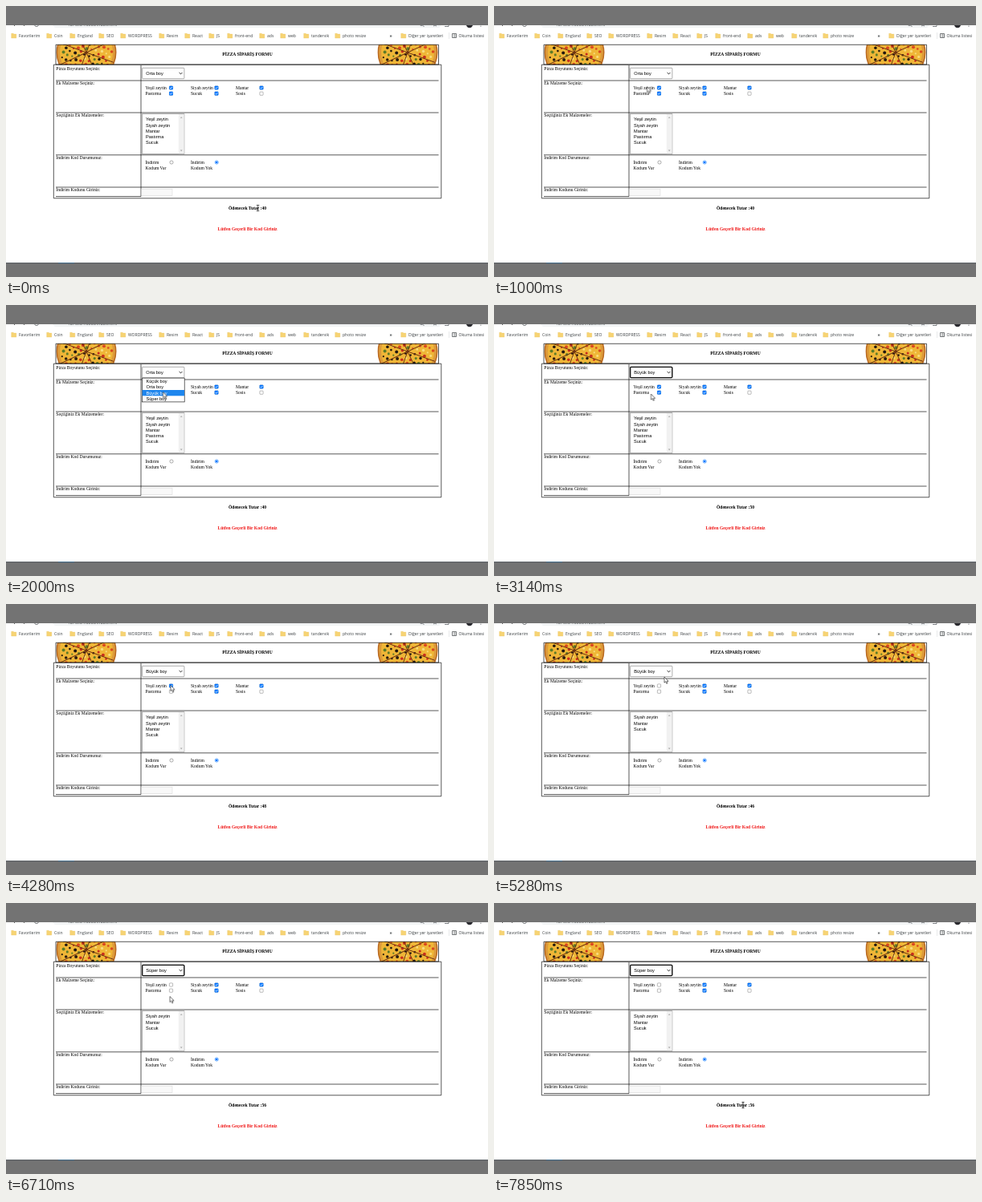
These frames come from a looping animation (600x338 px, 8000 ms). An HTML page:

```html
<!DOCTYPE html>
<html lang="tr">
<head>
<meta charset="utf-8">
<title>Pizza sipariş formu</title>
<style>
html, body { margin: 0; height: 100%; overflow: hidden; background: #fff; }
svg { display: block; width: 100vw; height: 100vh; }
text { font: 5.6px "Liberation Serif", "Times New Roman", serif; }
.sans { font-family: "Liberation Sans", Arial, sans-serif; }
.bar { font: 5.05px "Open Sans", "Noto Sans", sans-serif; fill: #3c4043; }
.bold { font-weight: bold; }
.mid { text-anchor: middle; }
.line { fill: none; stroke: #111; stroke-width: .7; }
.field { fill: #fff; stroke: #767676; stroke-width: .6; }
.icon { fill: none; stroke: #5f6368; stroke-width: .8; }
#pointer { animation: move 8s ease-in-out infinite; }
@keyframes move {
  0%, 1.75% { transform: translate(313.5px, 252px); }
  10.75%, 12.5% { transform: translate(190.5px, 100.5px); }
  16%, 17.9% { transform: translate(196px, 84px); }
  23.25%, 28.6% { transform: translate(195.5px, 108.5px); }
  30.4%, 41.1% { transform: translate(195.5px, 111px); }
  46.25%, 48.25% { transform: translate(205px, 108.5px); }
  51.75%, 60.75% { transform: translate(205px, 101.5px); }
  66% { transform: translate(212px, 91px); }
  67.9%, 69.6% { transform: translate(212px, 85px); }
  75%, 78.6% { transform: translate(204px, 114.5px); }
  80.4%, 89.25% { transform: translate(204px, 116.5px); }
  94.6%, 100% { transform: translate(310px, 252px); }
}
</style>
</head>
<body>
<svg id="stage" viewBox="0 0 600 338" preserveAspectRatio="none"></svg>
<script>
const LOOP = 8000;
// Moments of the session, in ms
const OPEN_1 = 1430, PICK_1 = 2290, UNCHECK_1 = 3860, UNCHECK_2 = 4290, OPEN_2 = 5570, PICK_2 = 6290;

const text = (x, y, str, cls = '', extra = '') => `<text x="${x}" y="${y}" class="${cls}" ${extra}>${str}</text>`;
const rect = (x, y, w, h, extra = '') => `<rect x="${x}" y="${y}" width="${w}" height="${h}" ${extra}/>`;
const path = (d, extra = 'class="line"') => `<path d="${d}" ${extra}/>`;
const dot = (x, y, r, extra) => `<circle cx="${x}" cy="${y}" r="${r}" ${extra}/>`;
const during = (spans, content) => `<g data-on="${spans.join(' ')}">${content}</g>`;

function browserBar() {
  const folders = [[16, 'Favorilerim'], [60, 'Coin'], [89, 'England'], [125, 'SEO'], [152, 'WORDPRESS'],
    [200, 'Resim'], [232, 'React'], [262, 'JS'], [285, 'front-end'], [325, 'ads'], [351, 'web'],
    [380, 'tandervik'], [419, 'photo resize'], [501, 'Diğer yer işaretleri']];
  const folder = ([x, name]) =>
    path(`M${x - 9.3} 34.2h2.4l.8 .9h2.9v5h-6.1z`, 'fill="#f7d474" stroke="#e3bb52" stroke-width=".3"') +
    text(x, 38.9, name, 'bar');
  return rect(58, 18, 484, 9, 'rx="4.5" fill="#f1f3f4"') +
    text(77, 25.2, '127.0.0.1:5500/index.html', 'bar') +
    path('M9 23l2 2M22 25l2-2') + dot(38, 23, 2.6, 'class="icon"') +
    dot(517, 22.5, 2, 'class="icon"') + path('M518.5 24l2 2M532 25l2-1 2 1M546 25.5h5v-2', 'class="icon"') +
    dot(577, 23, 4.2, 'fill="#2b2b30"') + dot(591, 25.2, .6, 'fill="#5f6368"') +
    folders.map(folder).join('') +
    text(477.5, 38.7, '»', 'bar bold') +
    path('M551.5 33v8', 'stroke="#dadce0" stroke-width=".6"') +
    path('M555.5 34.5h5v5h-5zM557 36h2.5M557 38h2.5', 'fill="none" stroke="#3c4043" stroke-width=".7"') +
    text(563.5, 38.9, 'Okuma listesi', 'bar');
}

function pizza() {
  const colors = ['#c92f1c', '#21170f', '#f8dc7c', '#5d7c28', '#d9481f', '#2b1c10'];
  let art = dot(100, 58, 37.5, 'fill="#b9681f"') + dot(100, 58, 36, 'fill="#dc9a3b"') + dot(100, 58, 33, 'fill="#efb637"');
  for (let i = 1; i < 90; i++) {
    const angle = i * 2.4, r = 3.35 * Math.sqrt(i);
    art += dot((100 + r * Math.cos(angle)).toFixed(1), (58 + r * Math.sin(angle)).toFixed(1),
      1.1 + i * 7 % 5 * .22, `fill="${colors[i * 5 % 7 % 6]}"`);
  }
  for (let i = 0; i < 8; i++)
    art += path('M100 58h36', `stroke="#6d3211" stroke-width=".9" transform="rotate(${i * 45 + 20} 100 58)"`);
  return `<clipPath id="crop">${rect(62.3, 48.3, 76.2, 24.6)}</clipPath><g id="pizza" clip-path="url(#crop)">${art}</g>` +
    '<use href="#pizza" x="400"/>';
}

function checkbox(x, y, on) {
  const box = rect(x - 2.1, y - 2.1, 4.2, 4.2, 'rx=".7" fill="#fff" stroke="#767676" stroke-width=".5"');
  const tick = rect(x - 2.35, y - 2.35, 4.7, 4.7, 'rx=".8" fill="#0075ff"') +
    path(`M${x - 1.4} ${y}l1 1.1 1.8-2.1`, 'fill="none" stroke="#fff" stroke-width=".8"');
  return box + (on ? during([0, on], tick) : '');
}

function formFrame() {
  const labels = [[80.3, 'Pizza Boyutunu Seçiniz:'], [97.5, 'Ek Malzeme Seçiniz:'], [138, 'Seçtiğiniz Ek Malzemeler:'],
    [190.5, 'İndirim Kod Durumunuz:'], [231.4, 'İndirim Kodunu Giriniz:']];
  return path('M62 48.3H538.5V73H62z') + path('M59.3 73.2H541.8V239.8H59.3z') +
    path('M168 74V237.6M62 93H538.5M62 133H538.5M62 185.8H538.5M62 226H538.5M62 237.6H168') +
    text(300.5, 62.2, 'PİZZA SİPARİŞ FORMU', 'bold mid') +
    labels.map(([y, s]) => text(62.3, y, s)).join('');
}

function toppings() {
  const items = [[173.5, 102, 'Yeşil zeytin', UNCHECK_2], [173.5, 109.2, 'Pastırma', UNCHECK_1],
    [230, 102, 'Siyah zeytin', LOOP], [230, 109.2, 'Sucuk', LOOP], [286, 102, 'Mantar', LOOP], [286, 109.2, 'Sosis', 0]];
  return items.map(([x, y, s, on]) => text(x, y + 1.9, s) + checkbox(x + 32, y, on)).join('');
}

function chosenList() {
  const states = [[0, UNCHECK_1, 'Yeşil zeytin,Siyah zeytin,Mantar,Pastırma,Sucuk'],
    [UNCHECK_1, UNCHECK_2, 'Yeşil zeytin,Siyah zeytin,Mantar,Sucuk'], [UNCHECK_2, LOOP, 'Siyah zeytin,Mantar,Sucuk']];
  return rect(169.5, 134.7, 52.4, 49.8, 'class="field"') + rect(214.8, 135, 6.8, 49.2, 'fill="#f1f1f1"') +
    path('M216.8 139.8l1.4-1.6 1.4 1.6zM216.8 179.6l1.4 1.6 1.4-1.6z', 'fill="#a3a3a3"') +
    states.map(([a, b, names]) => during([a, b],
      names.split(',').map((s, i) => text(174, 143.3 + i * 7.2, s, 'sans')).join(''))).join('');
}

function discount() {
  return text(173.5, 197, 'İndirim') + text(173.5, 203.8, 'Kodum Var') +
    text(230, 197, 'İndirim') + text(230, 203.8, 'Kodum Yok') +
    dot(206, 195, 2.1, 'class="field"') +
    dot(262.2, 195, 2.1, 'fill="#fff" stroke="#0075ff" stroke-width=".6"') + dot(262.2, 195, 1.3, 'fill="#0075ff"') +
    rect(168.8, 228.2, 38.2, 8.2, 'fill="#f8f8f8" stroke="#d5d5d5" stroke-width=".5"');
}

function sizeSelect() {
  const names = ['Küçük boy', 'Orta boy', 'Büyük boy', 'Süper boy'];
  const rowY = i => 91.4 + i * 7.3;
  const highlight = (i, spans) => during(spans,
    rect(169.6, rowY(i), 52.4, 7.3, 'fill="#1e86ee"') + text(174.5, rowY(i) + 5.6, names[i], 'sans', 'fill="#fff"'));
  return rect(169.5, 77.3, 52.4, 13.4, 'rx=".8" class="field"') +
    during([PICK_1, UNCHECK_1, PICK_2, LOOP], rect(169.7, 77.4, 52.1, 13.2, 'rx="1" fill="none" stroke="#101010" stroke-width="1.3"')) +
    path('M215.6 83l1.9 1.9 1.9-1.9', 'fill="none" stroke="#111" stroke-width=".9"') +
    [[1, 0, PICK_1], [2, PICK_1, PICK_2], [3, PICK_2, LOOP]]
      .map(([i, a, b]) => during([a, b], text(174.3, 86.1, names[i], 'sans'))).join('') +
    during([OPEN_1, PICK_1, OPEN_2, PICK_2],
      rect(169.4, 91.1, 52.8, 29.8, 'fill="#fff" stroke="#222" stroke-width=".7"') +
      names.map((s, i) => text(174.5, rowY(i) + 5.6, s, 'sans')).join('')) +
    highlight(1, [OPEN_1, 1710]) + highlight(2, [1710, PICK_1, OPEN_2, 5860]) + highlight(3, [5860, PICK_2]);
}

function totals() {
  const sums = [[0, PICK_1, 40], [PICK_1, UNCHECK_1, 50], [UNCHECK_1, UNCHECK_2, 48], [UNCHECK_2, PICK_2, 46], [PICK_2, LOOP, 56]];
  return sums.map(([a, b, n]) => during([a, b], text(300.5, 254.1, `Ödenecek Tutar :${n}`, 'bold mid'))).join('') +
    text(300.5, 279.8, 'Lütfen Geçerli Bir Kod Giriniz', 'bold mid', 'fill="#f01818"');
}

function pointer() {
  const arrow = path('M0 0V7.2L1.6 5.7 2.8 8.3 4 7.8 2.9 5.3H5.1z', 'fill="#fff" stroke="#111" stroke-width=".6"');
  const beam = path('M-1.5-3.6H1.5M0-3.6V3.6M-1.5 3.6H1.5', 'fill="none" stroke="#111" stroke-width=".8"');
  return `<g id="pointer">${during([290, 7430], arrow)}${during([0, 290, 7430, LOOP], beam)}</g>`;
}

const bands = rect(0, 0, 600, 24, 'fill="#737373"') + rect(0, 320.6, 600, 17.4, 'fill="#737373"') +
  rect(0, 320.2, 600, .9, 'fill="#454b52"') + rect(65, 320.2, 20, .9, 'fill="#3f6f92"');

document.getElementById('stage').innerHTML = rect(0, 0, 600, 338, 'fill="#fff"') + browserBar() + bands + pizza() +
  formFrame() + toppings() + chosenList() + discount() + totals() + sizeSelect() + pointer();

// Turns each data-on list of start and end times into stepped keyframes
const rules = new Map();
for (const el of document.querySelectorAll('[data-on]')) {
  const times = el.dataset.on.split(' ');
  const name = 'on-' + times.join('-');
  const steps = times.map((t, i) => `${t / LOOP * 100}%{visibility:${i % 2 ? 'hidden' : 'visible'}}`);
  rules.set(name, `@keyframes ${name}{0%{visibility:hidden}${steps.join('')}}`);
  el.style.animation = `${name} ${LOOP}ms step-end infinite`;
}
const sheet = document.createElement('style');
sheet.textContent = [...rules.values()].join('\n');
document.head.append(sheet);
</script>
</body>
</html>
```
